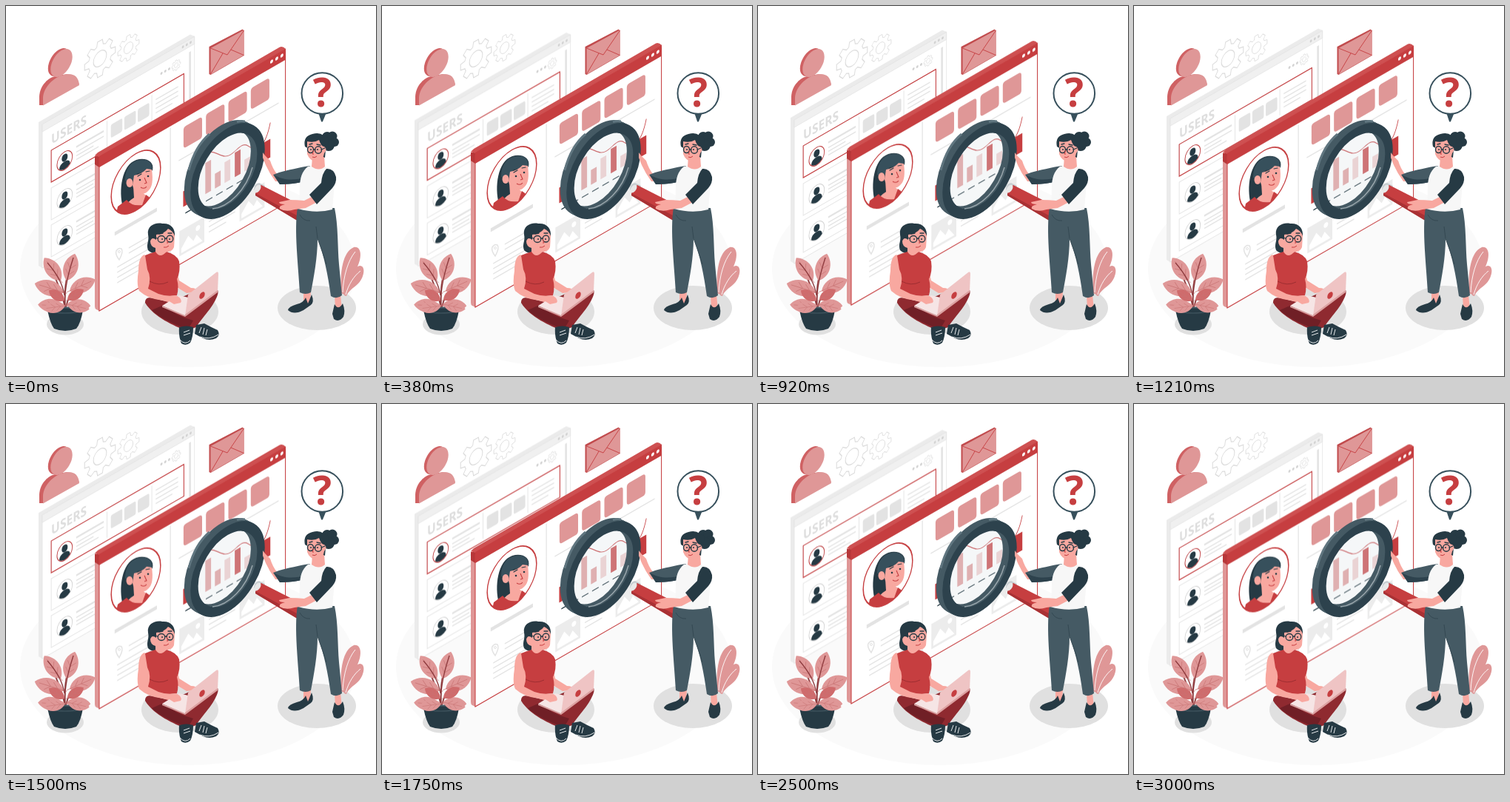
An HTML page without scripts for the animation above (3040 ms loop, 500 by 500 pixels).

```html
<!DOCTYPE html>
<html lang="en">
<head>
<meta charset="utf-8">
<title>User research</title>
<style>
html, body { margin: 0; width: 100%; height: 100%; overflow: hidden; background: #fff; }
svg { display: block; width: 100vw; height: 100vh; }
.front { animation: lift 760ms linear infinite alternate; }
.back { animation: lift 1520ms linear infinite alternate; }
@keyframes lift { to { transform: translateY(-10px); } }
text { font-family: "Open Sans", "Noto Sans", sans-serif; font-weight: 700; }
.red { fill: #c63e40; }
.pink { fill: #df9797; }
.skin { fill: #f8a8a0; }
.ink { fill: #263a44; }
.slate { fill: #455a64; }
.pale { fill: #e3e3e3; }
.line { fill: none; stroke: #e3e3e3; }
.rline { fill: none; stroke: #c63e40; }
.iline { fill: none; stroke: #263a44; stroke-linecap: round; }
</style>
</head>
<body>
<svg viewBox="0 0 500 500">
<defs>
  <clipPath id="face"><circle r="38.5" transform="matrix(.866 -.5 0 1 175.5 238)"/></clipPath>
  <path id="tooth" d="M13.9-5.8L14.5-4.2L20-3.2V3.2L14.5 4.2L13.9 5.8"/>
  <g id="teeth"><use href="#tooth"/><use href="#tooth" transform="rotate(45)"/></g>
  <g id="gear" fill="none" stroke="#dcdcdc">
    <use href="#teeth"/><use href="#teeth" transform="rotate(90)"/>
    <use href="#teeth" transform="rotate(180)"/><use href="#teeth" transform="rotate(270)"/>
    <circle r="8.5"/>
  </g>
  <g id="leaf">
    <path d="M0 0C-13-9-13-28 0-38C13-28 13-9 0 0Z"/>
    <path d="M0 4V-32M0-8L-6-15M0-8L6-15M0-17L-6-24M0-17L6-24" fill="none" stroke="#c97575" stroke-width=".7"/>
  </g>
  <g id="user">
    <circle r="12" fill="#fff"/>
    <ellipse class="ink" stroke="none" cy="-4" rx="4.6" ry="5"/>
    <path class="ink" stroke="none" d="M-8.500 8Q-8 1 0 1Q8 1 8.500 8Q0 15-8.500 8Z"/>
  </g>
  <g id="row">
    <path class="line" d="M0 0H207V43H0Z"/>
    <use href="#user" x="21" y="24.500" stroke="#d2d2d2"/>
    <path class="line" stroke-width="2.600" d="M39 15H82"/>
    <path class="line" stroke-width="1.400" d="M39 22H82M39 27H66M39 32H74"/>
  </g>
  <g id="photo">
    <path fill="#ececec" d="M0 0H39V34H0Z"/>
    <path fill="#fff" d="M3 31V25L14 13L22 24L27 18L36 31Z"/><circle cx="29" cy="10" r="3.500" fill="#fff"/>
  </g>
  <rect id="tile" x="-14.500" y="-14.500" width="29" height="29" rx="4"/>
</defs>

<ellipse cx="246" cy="355" rx="227" ry="133" fill="#fafafa"/>
<g fill="#e0e0e0">
  <ellipse cx="80" cy="430" rx="25" ry="14.500"/>
  <ellipse cx="235" cy="413" rx="52" ry="31"/>
  <ellipse cx="420" cy="408" rx="53" ry="30"/>
</g>

<!-- gears, person and envelope -->
<use href="#gear" transform="matrix(1.04 -.6 0 1.2 127 71)"/>
<use href="#gear" transform="matrix(.72 -.42 0 .84 165.500 56.500)"/>
<g fill="#cf6163">
  <circle cx="0" cy="0" r="17" transform="matrix(.866 -.5 0 1 71.500 76)"/>
  <path d="M45 134V122C46 107 57 96 70 94L83 92L99 105L50 134Z"/>
</g>
<g class="pink">
  <circle r="17" transform="matrix(.866 -.5 0 1 75 77)"/>
  <path d="M50 134.500V124C51 109 65 96 78 93C90 90 98 94 99 107Z"/>
</g>
<path fill="#c14b4d" d="M274.500 55L319.500 31.500L321.500 33V67L276.500 93L274.500 92Z"/>
<path class="pink" d="M276.500 57L321.500 32.500V66.500L276.500 92.500Z"/>
<path class="rline" stroke-width=".9" d="M276.500 57L299 66L321.500 33M276.500 92L293 64M321.500 66.500L304 59"/>

<g class="back">
  <path fill="#ebebeb" d="M44 157L249 38.500L255 41L49 160V354L44 351Z"/>
  <g transform="matrix(.866 -.5 0 1 49 160)">
    <path fill="#fff" stroke="#e6e6e6" d="M0 0H237.500V194H0Z"/>
    <path fill="#f0f0f0" stroke="#e3e3e3" stroke-width=".7" d="M0 0H237.500V10H0Z"/>
    <g fill="#d2d2d2">
      <circle cx="219.500" cy="5" r="1.700"/><circle cx="225.500" cy="5" r="1.700"/><circle cx="231.500" cy="5" r="1.700"/>
      <circle cx="186" cy="24" r="1.700"/><circle cx="192" cy="24" r="1.700"/><circle cx="198" cy="24" r="1.700"/>
    </g>
    <use href="#gear" transform="translate(209 24.500) scale(.34)" stroke-width="2"/>
    <path class="line" stroke-width="3" d="M230.500 17V90"/>
    <text x="14" y="34" font-size="18" fill="#dedede">USERS</text>
    <use href="#row" x="14" y="42"/><use href="#row" x="14" y="93"/><use href="#row" x="14" y="143"/>
    <path class="rline" stroke-width="1.200" d="M14 42H221V85H14Z"/>
    <circle class="rline" cx="35" cy="66.500" r="12"/>
    <path class="line" d="M101 46V81M171 46V81"/>
    <g class="pale">
      <use href="#tile" transform="translate(116 63) scale(.62)"/>
      <use href="#tile" transform="translate(137 63) scale(.62)"/>
      <use href="#tile" transform="translate(158 63) scale(.62)"/>
    </g>
    <path class="line" stroke-width="1.400" d="M177 55H212M177 61H212M177 67H212M177 73H203"/>
  </g>
</g>

<g class="front">
  <path class="pink" d="M120 202L126 206V412L122 410Q120 409 120 406Z"/>
  <path fill="#b73739" d="M120 203L126 203V218L120 214Z"/>
  <path fill="#ce5051" d="M120 202L124 198L370 55.500Q374 54 378 58L126 204Z"/>
  <g transform="matrix(.866 -.5 0 1 126 207)">
    <path fill="#fff" stroke="#c63e40" stroke-width="1.200" d="M0 0H290.500V205H0Z"/>
    <path class="red" d="M0-4H291V11H0Z"/>
    <g fill="#fff"><circle cx="269" cy="2.500" r="2.300"/><circle cx="277" cy="2.500" r="2.300"/><circle cx="285" cy="2.500" r="2.300"/></g>
    <path class="line" stroke-width="1.400" d="M111 13V192M124 64H280"/>
    <path class="line" stroke-width="5" d="M24 113H90"/>
    <path class="line" stroke-width="1.700" d="M46 143H92M46 150H84M28 160H92M28 167H92M28 174H92M28 181H70"/>
    <g class="pink">
      <use href="#tile" x="146" y="37"/><use href="#tile" x="181" y="37"/>
      <use href="#tile" x="216" y="37"/><use href="#tile" x="251" y="37"/>
    </g>
    <g class="pink">
      <path class="red" d="M131 109H140V130H131ZM211.500 97H220.500V130H211.500ZM256 106H267V131H256Z"/>
      <path d="M165.500 88H174.500V130H165.500ZM180.500 110H189.500V130H180.500Z"/>
      <path fill="#efcaca" d="M195.500 102H204.500V130H195.500ZM226.500 114H235.500V130H226.500Z"/>
    </g>
    <path class="rline" stroke="#d77" d="M150 84C170 62 182 86 196 94S220 85 232 98S258 118 267 84"/>
    <path class="iline" stroke-width="1.500" stroke-dasharray="9 7" d="M135 140H250"/>
    <use href="#photo" x="125" y="160"/><use href="#photo" x="219" y="160"/>
    <path class="line" stroke-width="1.700" d="M171 163H212M171 170H212M171 177H212M171 184H198"/>
  </g>
  <path class="line" stroke="#d4d4d4" stroke-width="1.500" d="M153 343Q147 335 149 331Q152 326 156 328Q159 332 153 343Z"/>
  <circle cx="153" cy="332" r="1.500" class="line"/>
  <g clip-path="url(#face)">
    <path fill="#fff" d="M140 190H212V286H140Z"/>
    <path class="ink" d="M158 272C152 250 156 215 176 208C190 204 201 211 198 222L184 230L174 236L173 271Z"/>
    <path fill="#37505c" d="M161 236C161 219 170 209 182 208C193 206 200 214 197 223L178 226L168 240Z"/>
    <path class="skin" d="M172 243L173 259Q164 264 158 276L190 281L196 264L188 255Z"/>
    <path class="red" d="M147 290L151 271L163 262Q170 271 184 269L189 255Q198 260 201 272V290Z"/>
    <path class="skin" d="M173 229Q184 227 190 220L197 221Q200 242 193 249Q187 256 179 253Q172 249 171 242Z"/>
    <ellipse class="skin" cx="167" cy="239" rx="4.500" ry="6"/>
    <path class="iline" stroke-width="1.200" d="M178 230L183 227M189 224L194 223"/>
    <g class="ink"><circle cx="181" cy="235" r="1.300"/><circle cx="192" cy="230" r="1.300"/></g>
    <path class="rline" stroke-width="1.100" d="M187 232L190 239L187 240M182 245Q187 248 190 244"/>
  </g>
  <circle class="rline" stroke-width="1.700" r="38.500" transform="matrix(.866 -.5 0 1 175.500 238)"/>
</g>

<!-- magnifier -->
<g fill="none" stroke="#455a64" stroke-width="12">
  <circle r="47" fill="#dfe5e8" fill-opacity=".32" stroke="none" transform="matrix(.866 -.5 0 1 297 222)"/>
  <circle r="52" transform="matrix(.866 -.5 0 1 291 219)"/>
  <circle r="52" transform="matrix(.866 -.5 0 1 294 220.500)"/>
  <circle r="52" transform="matrix(.866 -.5 0 1 297 222)"/>
  <circle r="52" stroke="#2d424d" transform="matrix(.866 -.5 0 1 299.500 223)"/>
  <path stroke="#98a5ab" stroke-width="1.500" d="M279 274C301 272 325 248 333 218"/>
  <path stroke="#607680" stroke-width="3" d="M247 222C252 202 262 184 275 173M312 156.500Q318 155 323 156"/>
</g>
<path fill="#c8ced1" d="M335 248Q335 240 342 239L350 243L343 256Z"/>
<path class="red" d="M345 242L402 271Q409 278 404 287Q399 292 392 289L337 256Q337 246 345 242Z"/>
<path fill="#a93134" d="M337 253L393 283Q401 286 406 279Q407 288 400 291Q396 291 392 289L337 256Z"/>
<ellipse cx="340" cy="247" rx="3.500" ry="6" fill="#e8e8e8" transform="rotate(35 340 247)"/>

<!-- right plant -->
<g class="pink">
  <path d="M453 388C451 360 455 332 470 326C482 324 482 344 470 361C463 372 459 379 457 390Z"/>
  <path d="M457 391C458 373 466 354 478 351C487 351 484 368 475 376C468 382 462 386 460 392Z"/>
</g>
<path fill="none" stroke="#fff" stroke-width=".9" d="M455 387C456 365 462 344 472 332M459 390C463 376 470 365 479 358"/>

<!-- standing woman -->
<path class="skin" d="M402 384L412 385L411 401L402 402ZM444 390H452L454 410H445Z"/>
<path class="ink" d="M381 411Q382 406 393 403Q402 401 405 394L408 402L413 390Q417 400 412 404L402 411Q389 418 381 411ZM441 416Q443 407 444 403Q449 412 455 402Q459 412 456 420Q450 428 443 423Z"/>
<path class="slate" d="M394 272L444 273C449 296 448 326 450 349L454 391Q447 397 439 392C435 363 430 338 421 314C421 340 416 366 412 387Q405 391 397 387C395 350 389 303 394 272Z"/>
<path fill="none" stroke="#344852" d="M421 314L419 298M397 282Q402 291 411 290M421 314Q428 333 433 349"/>
<path class="skin" d="M371 237L366 227Q360 219 357 209L350 202L347 198V205L351 215Q356 226 364 237Z"/>
<path class="slate" fill="#37505c" d="M411 216C396 218 381 222 369 225L361 228L370 241C387 241 401 238 409 235Z"/>
<path fill="#2d424d" d="M362 228L370 241C387 241 401 238 407 236L405 232C391 235 376 237 362 228Z"/>
<path fill="#f7f7f7" d="M408 217Q421 213 436 219Q446 224 444 239L441 275Q419 281 395 274C400 255 391 230 408 217Z"/>
<path class="skin" d="M414 203L430 203L431 217Q423 224 413 217Z"/>
<path class="skin" d="M419 255L403 263Q393 262 383 262L369 265Q369 268 377 268Q368 270 370 274Q378 279 390 275L405 273L424 263Z"/>
<path class="ink" fill="#2d424d" d="M433 220Q443 219 446 231Q447 239 441 246L420 268L410 255L426 239Q427 226 433 220Z"/>
<g class="ink">
  <path d="M404 190Q401 176 414 173Q430 169 433 183L431 205L423 201Z"/>
  <circle cx="434" cy="177" r="7"/><circle cx="441" cy="176" r="6.500"/><circle cx="444" cy="184" r="6"/><circle cx="436" cy="188" r="8"/><circle cx="430" cy="182" r="6"/>
</g>
<path class="skin" d="M407 183Q417 185 423 181Q426 190 430 190Q435 193 430 199Q429 208 420 211Q410 209 407 200Z"/>
<path class="iline" stroke-width="1.300" d="M410 187L414 186M420 187L425 188M416 194H418M426 194L431 192"/>
<g class="iline" stroke-width="1.400"><ellipse cx="411.500" cy="194" rx="4" ry="4.500"/><ellipse cx="422" cy="194.500" rx="4.500" ry="4.700"/></g>
<g class="ink"><circle cx="412" cy="194" r="1"/><circle cx="421" cy="194" r="1"/></g>
<path class="rline" d="M414 204Q417 206 420 203M416 195L414 200H416"/>

<!-- speech bubble -->
<path fill="#37505c" d="M422 144H433L428 156Q427 157 426 156Z"/>
<circle cx="427.300" cy="118" r="27.800" fill="#fff" stroke="#37505c" stroke-width="2"/>
<text class="red" x="427.500" y="136" font-size="53" text-anchor="middle">?</text>

<!-- seated woman -->
<g class="ink">
  <path d="M192 330C189 321 194 318 192 309C190 297 202 292 211 294C223 293 229 301 228 311L213 309L207 333Q198 336 192 330Z"/>
</g>
<path class="skin" d="M203 309Q214 308 219 301Q226 304 228 311L227 326Q224 333 216 332L217 341L202 340V327Q195 325 195 318Q197 311 203 316Z"/>
<path fill="#8f2a30" d="M188 401C188 389 201 396 216 399C235 399 262 378 279 379Q290 381 285 393C279 408 265 421 257 434L243 439C228 432 200 421 188 401Z"/>
<path fill="#701f26" d="M213 404Q229 419 253 425L246 437C228 431 207 421 197 411Z"/>
<path class="skin" d="M187 336Q179 339 179 358Q176 376 180 385Q192 396 212 398L229 403Q238 401 234 395L222 391L199 381L203 350Z"/>
<path class="skin" d="M230 353L234 371L250 381Q258 381 259 386L244 388L226 377Z"/>
<path class="red" d="M188 337Q195 334 202 332Q208 342 217 332Q231 336 234 345Q236 359 231 369Q234 380 231 391Q217 393 206 389L192 382Q197 367 191 356Z"/>
<path fill="none" stroke="#9e2e32" d="M194 372Q207 379 219 373"/>
<g class="iline" stroke-width="1.300"><ellipse cx="210" cy="315" rx="4.800" ry="4.500"/><ellipse cx="221.500" cy="314.500" rx="4.300" ry="4.500"/><path d="M214.500 314H217M205 314L199 312M207 308L212 307M219 307L224 307"/></g>
<g class="ink"><circle cx="211" cy="315" r="1"/><circle cx="221" cy="315" r="1"/></g>
<path class="rline" d="M213 326Q217 327 220 324M217 315L219 320H217"/>
<path fill="#f6e5e5" d="M211 405L234 391L259 397L242 419Z"/>
<path fill="#d7a1a1" d="M211 405L242 418V420L211 407Z"/>
<path fill="#efc4c4" d="M246 390L284 360Q287 358 287 362L286 386L242 419Z"/>
<path fill="#dca0a0" d="M286 384V387L242 420V417Z"/>
<circle class="red" r="4.300" transform="matrix(.866 -.5 0 1 265 391)"/>
<path class="skin" d="M211 393L230 391Q239 396 236 401L227 403Z"/>
<path class="ink" d="M234 434Q244 431 253 434Q253 447 249 455Q243 460 237 456Q233 446 234 434ZM257 431L268 429Q277 434 286 438Q290 445 284 449Q275 453 266 449L255 443Z"/>
<path fill="none" stroke="#e7eaec" stroke-width="1" d="M240 441L248 438M240 445L249 442M264 434L261 442M268 435L266 444M272 437L270 445M235 451Q242 459 249 452M262 447Q275 452 287 444"/>

<!-- left plant -->
<path fill="none" stroke="#8f3c3f" stroke-width="1.800" d="M80 414C79 390 79 370 87 352M80 408Q74 380 62 359M81 407Q84 390 101 373M80 411L64 399M82 411L99 402"/>
<g class="pink">
  <use href="#leaf" transform="translate(82 371) rotate(17)"/>
  <use href="#leaf" transform="translate(74 371) rotate(-36)"/>
  <use href="#leaf" transform="translate(78 387) rotate(-73) scale(1.080)"/>
  <use href="#leaf" transform="translate(86 385) rotate(66)"/>
  <use href="#leaf" transform="translate(78 406) rotate(-86) scale(.92)"/>
  <use href="#leaf" transform="translate(82 404) rotate(92) scale(.85)"/>
  <g fill="#cf6b6c"><use href="#leaf" transform="translate(79 398) rotate(-57) scale(.66)"/><use href="#leaf" transform="translate(83 397) rotate(58) scale(.68)"/></g>
</g>
<path fill="none" stroke="#8f3c3f" stroke-width="1.300" d="M80 412C78 393 81 370 91 340M79 391Q76 370 56 347"/>
<path class="ink" d="M56 411Q60 430 65 436Q80 442 95 436Q101 429 104 411Z"/>
<ellipse class="slate" cx="80" cy="411" rx="24" ry="4.500"/>
<ellipse class="ink" cx="80" cy="411.500" rx="21" ry="3"/>
<g class="pink"><use href="#leaf" transform="translate(80 405) rotate(-98) scale(.8)"/><use href="#leaf" transform="translate(83 403) rotate(103) scale(.8)"/></g>
</svg>
</body>
</html>
```
